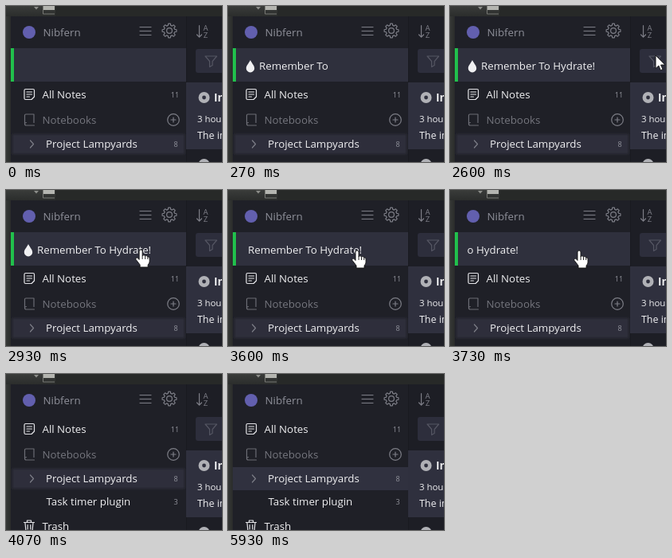
Recreate the animation shown at these times as an HTML page. Size 271x196 px, loop 6140 ms.

```html
<!DOCTYPE html>
<html lang="en">
<head>
<meta charset="utf-8">
<title>Notes sidebar</title>
<style>
  html, body { margin: 0; width: 100%; height: 100%; overflow: hidden; background: #1f2027; }
  svg { display: block; }
  text { font: 13.3px "Open Sans", "Noto Sans", sans-serif; fill: #f0f0f2; white-space: pre; }
  .dim { fill: #75767e; }
  .brand { fill: #8f909a; font-weight: 500; }
  .sort { fill: #7d7e87; font-size: 9.5px; }
  .count { font-size: 9px; fill: #92939c; text-anchor: middle; }
  .line { fill: none; stroke: #7d7e87; stroke-width: 1.2; stroke-linecap: round; stroke-linejoin: round; }
  .bright { stroke: #e4e4e8; }
  .faint { stroke: #6c6d75; }
  .faintest { stroke: #555663; }
</style>
</head>
<body>
<svg width="271" height="196" viewBox="0 0 271 196">
  <defs>
    <linearGradient id="shade" x1="0" y1="0" x2="0" y2="1">
      <stop offset="0" stop-color="#3a3c3a"/>
      <stop offset="1" stop-color="#2b2d2c"/>
    </linearGradient>
    <linearGradient id="edge" x1="0" y1="0" x2="1" y2="0">
      <stop offset="0" stop-color="#363836"/>
      <stop offset="1" stop-color="#2a2c2b"/>
    </linearGradient>
    <filter id="soft" x="-5%" y="-40%" width="110%" height="180%"><feGaussianBlur stdDeviation="1.600"/></filter>
    <clipPath id="rowBox"><rect x="6" y="159" width="220" height="29"/></clipPath>
  </defs>

  <!-- window behind -->
  <rect width="271" height="13" fill="url(#shade)"/>
  <rect x="62" width="209" height="13" fill="#272928"/>
  <rect y="13" width="6" height="183" fill="url(#edge)"/>
  <path d="M35 1H41L38 4.500Z" fill="#8d8e8a"/>
  <path d="M47 0H61V5H47Z" fill="#b4b5b0"/>
  <path d="M46.500 0V10H61" fill="none" stroke="#777874"/>

  <!-- sidebar -->
  <rect x="6" y="13" width="220" height="183" fill="#1f2027"/>
  <circle cx="29" cy="33" r="8" fill="#625fae"/>
  <text class="brand" x="46.500" y="37.500">Nibfern</text>
  <path class="line" d="M168 26.500H182M168 31.500H182M168 36.500H182"/>
  <path class="line" id="gear"/>
  <circle class="line" cx="205" cy="31" r="3.400"/>

  <g id="reminder">
    <rect x="6" y="53" width="220" height="42" fill="#2f303d"/>
    <rect x="6" y="53" width="4" height="42" fill="#21c04c"/>
    <path id="drop" d="M28 68C30 72 33.200 75 33.200 78.200A5.200 5.200 0 0 1 22.800 78.200C22.800 75 26 72 28 68Z" fill="#f0f0f2"/>
    <text id="message" y="80"></text>
  </g>

  <g id="list">
    <path class="line bright" d="M24.500 104.500H34Q35.500 104.500 35.500 106V114L32 117.500H24.500Q23 117.500 23 116V106Q23 104.500 24.500 104.500ZM26 108H32.500M26 111H32.500M26 114H29.500"/>
    <text x="45.500" y="116">All Notes</text>
    <text class="count" x="212" y="114.500">11</text>

    <path class="line faint" d="M23.500 148V137.500Q23.500 136 25 136H35V146.500M23.500 148Q23.500 146.500 25.500 146.500M23.500 148Q23.500 150 25.500 150H35.500"/>
    <text class="dim" x="45.500" y="148">Notebooks</text>
    <path class="line" d="M207 143H213M210 140V146"/>
    <circle class="line" cx="210" cy="143" r="7.300"/>

    <g clip-path="url(#rowBox)">
      <rect id="softRow" x="8" y="161" width="216" height="25" fill="#2d2e3b" filter="url(#soft)"/>
      <rect id="flatRow" x="6" y="159" width="220" height="29" fill="#30313f"/>
    </g>
    <path class="line" d="M30.500 169L34.500 173.500L30.500 178"/>
    <text x="50" y="178">Project Lampyards</text>
    <text class="count" x="213" y="176.500">8</text>

    <text x="50.500" y="207">Task timer plugin</text>
    <text class="count" x="213" y="205.500">3</text>

    <path class="line bright" d="M22.500 228.500H35.500M26.500 228V226H31.500V228M24 229L25 239.500H33L34 229M27.200 231.500V237M30.800 231.500V237"/>
    <text x="45.500" y="237.500">Trash</text>
  </g>

  <!-- note list -->
  <rect x="226" y="13" width="45" height="183" fill="#1d1e25"/>
  <path d="M226.500 13V196" stroke="#191a20"/>
  <path class="line" d="M242.500 24.500V39M239.500 36L242.500 39.200L245.500 36"/>
  <text class="sort" x="247.500" y="31">A</text>
  <text class="sort" x="247.800" y="40">Z</text>
  <rect x="238" y="54" width="40" height="30" rx="3" fill="#2d2e3c"/>
  <path class="line faintest" d="M250 63H264.500L259 69.500V74.500L255.500 76.500V69.500Z"/>
  <rect x="226" y="96" width="45" height="84" fill="#2f303e"/>
  <circle cx="248.500" cy="115" r="7" fill="#b0b1b6"/>
  <circle cx="248.500" cy="115" r="2.400" fill="#2f303e"/>
  <text x="261" y="119.500" style="font-weight:700">In</text>
  <text x="240" y="145.500" style="font-size:11.400px">3 hour</text>
  <text x="240" y="167" style="font-size:12.400px">The in</text>
  <circle cx="248.500" cy="199" r="7" fill="#b0b1b6"/>

  <!-- pointers, tip at 0,0 -->
  <path id="arrow" d="M0 0V16.500L3.800 13L6.300 18.700L9 17.500L6.500 12H11.800Z" fill="#fff" stroke="#111" stroke-width=".9"/>
  <g id="hand" stroke="#111" stroke-width=".9" stroke-linejoin="round">
    <path d="M-2 2Q-2 0 0 0T2 2V8Q2.500 6.500 4 6.800Q5.400 7 5.500 8.500Q6 7.300 7.300 7.700Q8.600 8 8.700 9.500Q9.400 8.700 10.300 9.200Q11 9.600 11 11V15Q11 17 9 19V22H-1V19L-6 12.500Q-6.800 11 -5.500 10.300Q-4.300 9.800 -3.200 11L-2 12.500Z" fill="#fff"/>
    <path d="M2 8V12M5.500 8.500V12M8.700 9.500V12" fill="none"/>
  </g>
</svg>
<script>
const LOOP = 6140;
const MESSAGE = " Remember To Hydrate!";
const LENGTH = MESSAGE.length + 1; // the drop counts as one character
const TYPE = [70, 130, 200, 270, 330, 400, 470];
const MOVE = [2600, 2670, 2730, 2800, 2870, 2930, 3000];
const ERASE = [3600, 3670, 3730, 3800, 3870];
const COLLAPSE = 4070, SETTLE = 5930;
const FROM = [258, 62], TO = [162, 76];

const $ = id => document.getElementById(id);
const show = (el, on) => el.setAttribute("visibility", on ? "visible" : "hidden");
const passed = (steps, t) => steps.filter(s => t >= s).length;
const ease = p => p * p * (3 - 2 * p);

function gearPath(cx, cy, teeth) {
  const points = [];
  for (let i = 0; i < teeth; i++) {
    for (const [offset, r] of [[-.33, 6.8], [-.18, 9], [.18, 9], [.33, 6.8]]) {
      const a = (i + offset) / teeth * 2 * Math.PI;
      points.push((cx + r * Math.cos(a)).toFixed(2) + " " + (cy + r * Math.sin(a)).toFixed(2));
    }
  }
  return "M" + points.join("L") + "Z";
}

function drawMessage(t) {
  const typed = Math.round(LENGTH * passed(TYPE, t) / TYPE.length);
  const gone = passed(ERASE, t);
  const erased = gone ? 1 + Math.round((LENGTH - 1) * (gone - 1) / (ERASE.length - 1)) : 0;
  const drop = typed > 0 && erased === 0;
  show($("drop"), drop);
  $("message").setAttribute("x", drop ? 35.5 : 21.5);
  $("message").textContent = MESSAGE.slice(Math.max(0, erased - 1), Math.max(0, typed - 1));
}

function drawPointer(t) {
  const visible = t >= MOVE[0] && t < ERASE[ERASE.length - 1];
  const p = ease(Math.max(0, passed(MOVE, t) - 1) / (MOVE.length - 1));
  const [x, y] = FROM.map((v, i) => v + (TO[i] - v) * p);
  const over = x < 226;
  for (const id of ["arrow", "hand"]) $(id).setAttribute("transform", `translate(${x} ${y})`);
  show($("arrow"), visible && !over);
  show($("hand"), visible && over);
}

function draw(t) {
  const collapsed = t >= COLLAPSE;
  $("reminder").setAttribute("display", collapsed ? "none" : "inline");
  $("list").setAttribute("transform", `translate(0 ${collapsed ? -42 : 0})`);
  show($("softRow"), t < SETTLE);
  show($("flatRow"), t >= SETTLE);
  drawMessage(t);
  drawPointer(t);
}

$("gear").setAttribute("d", gearPath(205, 31, 8));
const start = performance.now();
function tick() {
  draw((performance.now() - start) % LOOP);
  requestAnimationFrame(tick);
}
tick();
</script>
</body>
</html>
```
